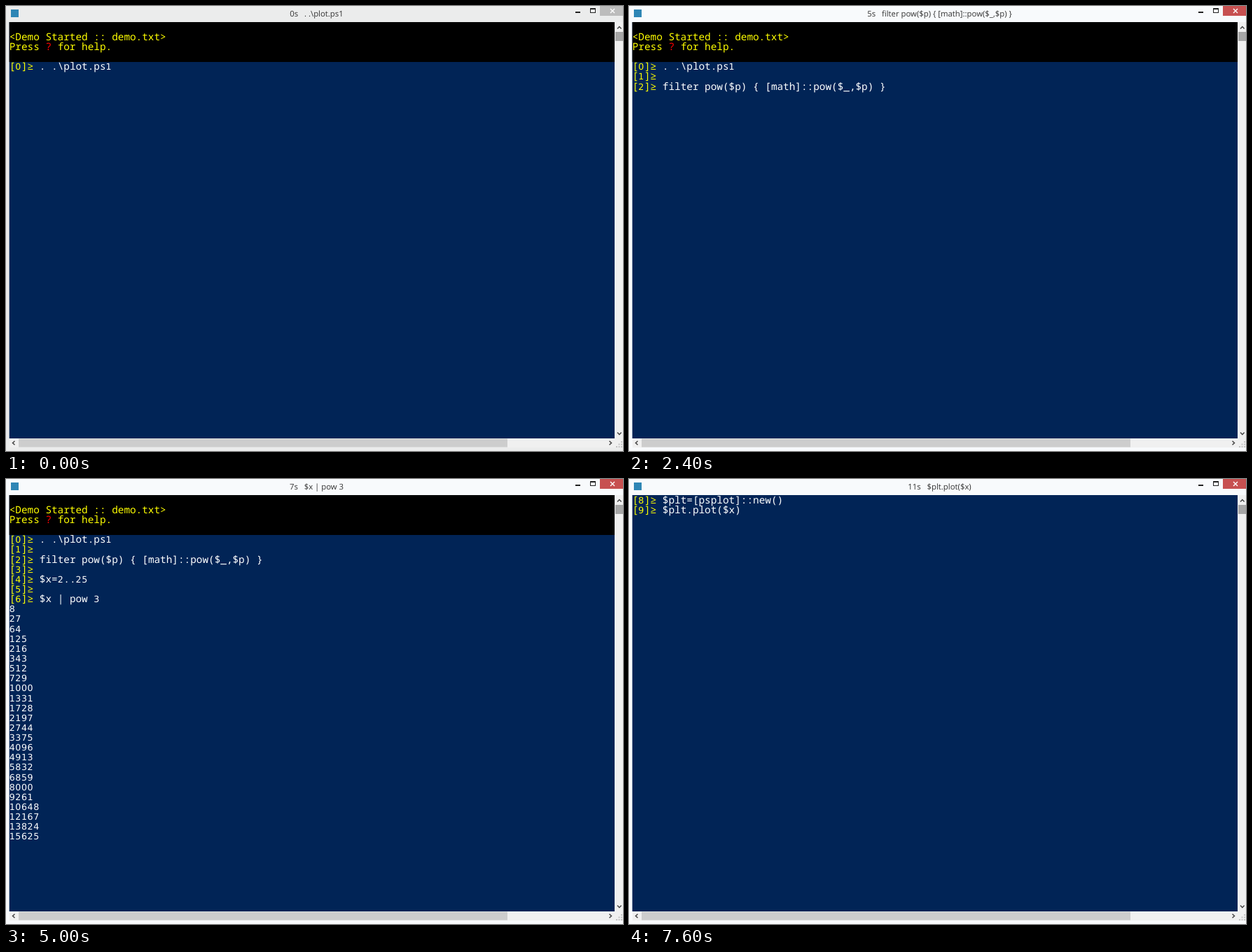
These frames come from a looping animation (881x636 px, 8 s). An HTML page:

```html
<!DOCTYPE html>
<html lang="en">
<head>
<meta charset="utf-8">
<title>Console demo</title>
<style>
  html, body { margin: 0; width: 100%; height: 100%; overflow: hidden; background: #f8fafc; }
  svg { display: block; width: 881px; height: 636px; }
  text { white-space: pre; text-rendering: geometricPrecision; }
  .title { font: 11.35px "Open Sans", sans-serif; fill: #333; text-anchor: middle; }
  .line { font: 14.36px "Noto Sans Mono", monospace; }
  .num { font: 12.6px "DejaVu Sans", sans-serif; letter-spacing: .6px; }
  .mark { fill: none; stroke: #444; stroke-width: 1.5; }
</style>
</head>
<body>
<svg id="stage" viewBox="0 0 881 636">
  <rect id="frame" width="881" height="636"/>
  <rect x="7" y="5" width="11" height="11" fill="#2f86b5"/>

  <rect x="813" y="8" width="7" height="2" fill="#222"/>
  <path d="M834 3h8v7h-8zM835 5v4h6v-4z" fill="#222" fill-rule="evenodd"/>
  <rect id="close" x="848" width="33" height="14"/>
  <path d="M863 4l6 6M869 4l-6 6" fill="none" stroke="#fff" stroke-width="1.4"/>

  <rect x="869" y="23" width="12" height="608" fill="#f0f0f0"/>
  <rect x="5" y="618" width="876" height="13" fill="#f0f0f0"/>
  <rect x="870" y="37" width="11" height="13" fill="#a6a6a6"/>
  <rect x="18" y="618.5" width="698" height="12" fill="#cdcdcd"/>
  <path class="mark" d="M873 32.5l2.8-3 2.8 3M873 609.5l2.8 3 2.8-3M12.5 621.7l-3 2.8 3 2.8M861.5 621.7l3 2.8-3 2.8"/>
  <path d="M878 622h2v2h-2zM874.500 625.500h2v2h-2zM878 625.500h2v2h-2zM871 629h2v2h-2zM874.500 629h2v2h-2zM878 629h2v2h-2z" fill="#c3c3c3"/>

  <rect x="4.700" y="23" width="864.300" height="595" fill="#012456"/>
</svg>
<script>
const LOOP = 8000, CLEAR = 6400;
const LEFT = 4.7, TOP = 23, CELL = 8.62, ROW = 14.14;
const YELLOW = '#ff0', WHITE = '#fff', RED = '#f00';
const stage = document.getElementById('stage');

function add(parent, tag, attrs, text = '') {
  const el = document.createElementNS('http://www.w3.org/2000/svg', tag);
  for (const key in attrs) el.setAttribute(key, attrs[key]);
  el.textContent = text;
  parent.append(el);
  return el;
}

function play(el, frames) {
  el.animate(frames, { duration: LOOP, iterations: Infinity });
}

// Visible only from one time to another, with hard cuts
function show(el, from, to) {
  const a = from / LOOP, b = to / LOOP;
  const frames = [];
  if (from > 0) frames.push({ offset: 0, opacity: 0 }, { offset: a, opacity: 0 });
  frames.push({ offset: a, opacity: 1 }, { offset: b, opacity: 1 });
  if (to < LOOP) frames.push({ offset: b, opacity: 0 }, { offset: 1, opacity: 0 });
  play(el, frames);
}

// Window gains focus in four equal steps
function focusFade(id, idle, active) {
  play(document.getElementById(id), [
    { offset: 0, fill: idle },
    { offset: 100 / LOOP, fill: idle, easing: 'steps(4, start)' },
    { offset: 500 / LOOP, fill: active },
    { offset: 1, fill: active }
  ]);
}

function line(row, runs, from, to = CLEAR) {
  const el = add(stage, 'text', { class: 'line', x: LEFT, y: TOP + row * ROW + 11.7 });
  for (const [text, fill] of runs)
    for (const part of text.split(/(\d+)/).filter(Boolean))
      add(el, 'tspan', /\d/.test(part) ? { class: 'num', fill } : { fill }, part);
  show(el, from, to);
}

function prompt(row, index, command, from, to) {
  line(row, [[`[${index}]≥ `, YELLOW], [command, WHITE]], from, to);
}

function cursor(col, row, from, to) {
  const el = add(stage, 'rect', {
    x: LEFT + col * CELL, y: TOP + row * ROW + 10.6, width: CELL, height: 3.7, fill: WHITE
  });
  show(el, from, to);
}

focusFade('frame', '#ebecec', '#f8fafc');
focusFade('close', '#bcbcbc', '#c75050');

const banner = add(stage, 'rect', { x: LEFT, y: TOP, width: 864.3, height: 57, fill: '#000' });
show(banner, 0, CLEAR);
line(1, [['<Demo Started :: demo.txt>', YELLOW]], 0);
line(2, [['Press ', YELLOW], ['?', RED], [' for help.', YELLOW]], 0);

// [time, seconds in title, command, prompt index, row]
const commands = [
  [0, 0, '. .\\plot.ps1', 0, 4],
  [2400, 5, 'filter pow($p) { [math]::pow($_,$p) }', 2, 6],
  [3400, 6, '$x=2..25', 4, 8],
  [4500, 7, '$x | pow 3', 6, 10],
  [6100, 9, '$plt=[psplot]::new()', 8, 36],
  [7600, 11, '$plt.plot($x)', 9, 1]
];
commands.forEach(([time, secs, command, index, row], i) => {
  const next = i + 1 < commands.length ? commands[i + 1][0] : LOOP;
  show(add(stage, 'text', { class: 'title', x: 443.5, y: 15 }, `${secs}s   ${command}`), time, next);
  if (index > 0 && index < 9) prompt(row - 1, index - 1, '', time);
  prompt(row, index, command, time, time < CLEAR ? CLEAR : LOOP);
});
prompt(0, 8, '$plt=[psplot]::new()', CLEAR, LOOP);

for (let n = 2; n <= 25; n++) line(n + 9, [[String(n ** 3), WHITE]], 5000);

cursor(19, 4, 900, 1400);
cursor(0, 35, 5800, 6100);
</script>
</body>
</html>
```
